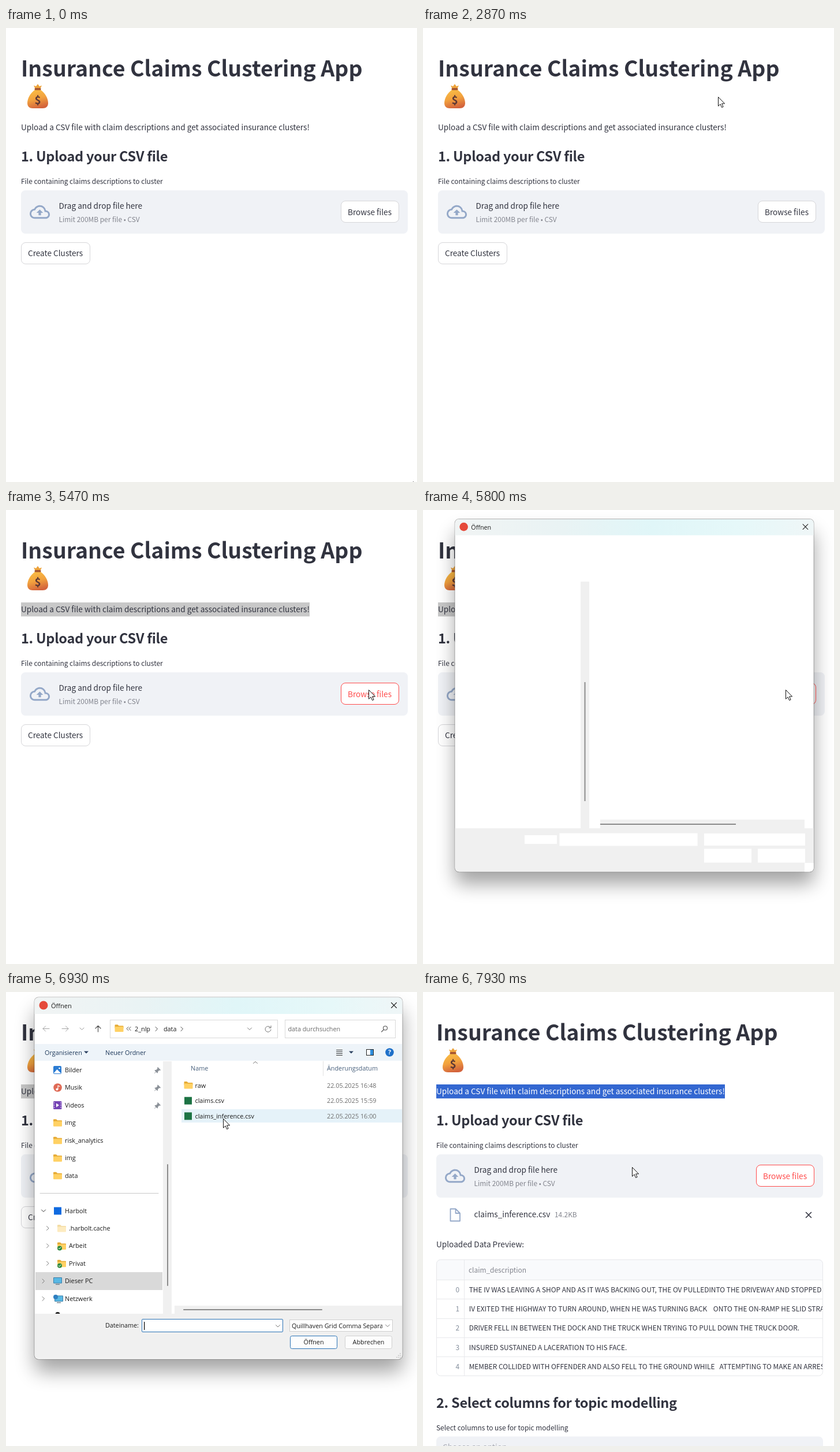
Recreate the animation shown at these times as an HTML page. Size 712 by 786 pixels, loop 8 s.

```html
<!DOCTYPE html>
<html lang="en">
<head>
<meta charset="utf-8">
<title>Claims clustering demo</title>
<style>
  html, body { margin: 0; width: 100%; height: 100%; overflow: hidden; background: #fff; }
  svg { display: block; width: 712px; height: 786px; }
  text { white-space: pre; }
  .page { font-family: "Noto Sans CJK JP", "Noto Sans CJK SC", "Noto Sans CJK", sans-serif; fill: #31333f; }
  .ui { font-family: "Open Sans", "Noto Sans", sans-serif; font-size: 10.8px; fill: #1b1b1b; }
  .head { font-weight: 600; letter-spacing: -.3px; }
  .line { fill: none; stroke-linecap: round; stroke-linejoin: round; }
</style>
</head>
<body>
<svg id="stage" viewBox="0 0 712 786"></svg>
<script>
const LOOP = 8000, STEP = 200 / 3;
const BODY = 13.62, SMALL = 11.92, HEAD = 23.55, TITLE = 37.46;
const INK = '#31333f', FADED = '#83858e', RED = '#ff4b4b', ICON = '#94a8c8';

const text = (x, y, str, size, more = '') =>
  `<text x="${x}" y="${y}"${size ? ` font-size="${size}"` : ''} ${more}>${str}</text>`;
const rect = (x, y, w, h, fill, more = '') =>
  `<rect x="${x}" y="${y}" width="${w}" height="${h}" fill="${fill}" ${more}/>`;
const path = (d, fill, more = '') => `<path d="${d}" fill="${fill}" ${more}/>`;
const line = (d, color, width = 1, more = '') =>
  `<path class="line" d="${d}" stroke="${color}" stroke-width="${width}" ${more}/>`;
const disc = (x, y, r, fill) => `<circle cx="${x}" cy="${y}" r="${r}" fill="${fill}"/>`;
const group = (id, body, more = '') => `<g id="${id}" ${more}>${body}</g>`;
const at = (x, y, body) => `<g transform="translate(${x} ${y})">${body}</g>`;
const mid = 'text-anchor="middle"';

/* ---------- web page ---------- */
const intro = 'Upload a CSV file with claim descriptions and get associated insurance clusters!';

const moneyBag =
  path('M50 107C42 113 37 122 37 130c0 6 4 9 9 9h18c5 0 9-3 9-9 0-8-5-17-13-23Z', 'url(#bag)') +
  path('M48 99.5l4 1.5 3-4 3 4 4-1.5-2.5 5.5h-9Z', '#eda33c') +
  rect(49.5, 104, 11, 3.6, '#a4532f', 'rx="1.5"') +
  text(55, 131.5, '$', 19, `${mid} font-weight="700" fill="#5d3834"`);

const cloud = at(41, 301, path(
  'M19.35 10.04A7.49 7.49 0 0 0 12 4C9.11 4 6.6 5.64 5.35 8.04A5.99 5.99 0 0 0 0 14c0 3.31 2.69 6 6 6h13' +
  'c2.76 0 5-2.24 5-5 0-2.64-2.05-4.78-4.65-4.96zM19 18H6c-2.21 0-4-1.79-4-4 0-2.05 1.53-3.76 3.56-3.97' +
  'l1.07-.11.5-.95C8.08 7.14 9.94 6 12 6c2.62 0 4.88 1.86 5.39 4.43l.3 1.5 1.53.11c1.56.1 2.78 1.41 2.78 2.96' +
  ' 0 1.65-1.35 3-3 3zM8 13h2.55v3h2.9v-3H16l-4-4z', ICON, 'transform="scale(1.46)"'));

const anchor = at(288, 215, line(
  'M6.5 8.5a3.6 3.6 0 0 0 5.4.4l2.2-2.2a3.6 3.6 0 0 0-5.1-5.1L7.8 2.9M9.5 7a3.6 3.6 0 0 0-5.4-.4' +
  'L1.9 8.8A3.6 3.6 0 0 0 7 13.9l1.2-1.2', '#a3a5ad', 1.5));

const fileRow =
  line('M50.5 375.5h9l7.5 7.5v13.5h-16.5zM59.5 375.5v7.5h7.5', ICON, 1.8) +
  text(91.5, 390, 'claims_inference.csv', BODY) +
  text(231, 390, '14.2KB', SMALL, `fill="${FADED}"`) +
  line('M666.5 381.5l9 9m0-9l-9 9', INK, 1.6);

const rows = [
  'THE IV WAS LEAVING A SHOP AND AS IT WAS BACKING OUT, THE OV PULLEDINTO THE DRIVEWAY AND STOPPED',
  'IV EXITED THE HIGHWAY TO TURN AROUND, WHEN HE WAS TURNING BACK    ONTO THE ON-RAMP HE SLID STRAIGHT',
  'DRIVER FELL IN BETWEEN THE DOCK AND THE TRUCK WHEN TRYING TO PULL DOWN THE TRUCK DOOR.',
  'INSURED SUSTAINED A LACERATION TO HIS FACE.',
  'MEMBER COLLIDED WITH OFFENDER AND ALSO FELL TO THE GROUND WHILE   ATTEMPTING TO MAKE AN ARREST'
];
const preview =
  text(26, 441.5, 'Uploaded Data Preview:', BODY) +
  `<g clip-path="url(#tableClip)">` +
  rect(26, 463, 670, 35, '#f9fafc') +
  text(82, 486, 'claim_description', SMALL, `fill="${FADED}"`) +
  rows.map((row, i) => {
    const y = 498 + i * 33.3;
    return line(`M26 ${Math.round(y) + .5}H696`, '#e8e9ec') +
      text(66, y + 21.7, i, SMALL, 'text-anchor="end" fill="#838d9b"') +
      text(82.7, y + 21.7, row, SMALL);
  }).join('') +
  line('M74.5 463V665', '#e8e9ec') + '</g>' +
  rect(26.5, 463.5, 669, 201, 'none', 'rx="7" stroke="#e6e7ea"') +
  text(26, 720, '2. Select columns for topic modelling', HEAD, 'class="head"') +
  text(26, 759, 'Select columns to use for topic modelling', SMALL) +
  rect(26, 769.5, 670, 40, '#f0f2f6', 'rx="7.5"') +
  text(37, 793, 'Choose an option', BODY, 'fill="#a7a9b2"');

const page = group('page',
  text(26, 83.5, 'Insurance Claims Clustering App', TITLE, 'font-weight="700"') +
  moneyBag +
  text(26, 177, intro, BODY) +
  `<g clip-path="url(#selClip)">` + rect(26, 160, 500, 24.5, '#3367d1', 'id="selBox"') +
  text(26, 177, intro, BODY, 'id="selText"') + '</g>' +
  text(26, 231, '1. Upload your CSV file', HEAD, 'class="head"') +
  group('anchor', anchor) +
  text(26, 270, 'File containing claims descriptions to cluster', SMALL) +
  rect(26, 281, 670, 75, '#f0f2f6', 'rx="7.5"') + cloud +
  text(91.5, 313, 'Drag and drop file here', BODY) +
  text(91.5, 336, 'Limit 200MB per file • CSV', SMALL, `fill="${FADED}"`) +
  rect(580.5, 299.5, 100, 37, '#fff', 'rx="7.5" id="browseBox"') +
  text(630, 323.5, 'Browse files', BODY, `${mid} id="browseText"`) +
  group('create', rect(26.5, 371.5, 119, 37, '#fff', 'rx="7.5" stroke="#d6d6d9"') +
    text(85.5, 395, 'Create Clusters', BODY, mid)) +
  group('fileRow', fileRow) + group('preview', preview), 'class="page"');

/* ---------- file dialog ---------- */
const chevron = {
  down: (x, y, c = '#777') => line(`M${x - 3.5} ${y - 2}l3.5 3.5 3.5-3.5`, c),
  right: (x, y, c = '#777') => line(`M${x - 2} ${y - 3.5}l3.5 3.5-3.5 3.5`, c),
  up: (x, y, c = '#777') => line(`M${x - 3.5} ${y + 1.5}l3.5-3 3.5 3`, c)
};
const drop = (x, y) => path(`M${x - 4} ${y - 2}h8l-4 4z`, '#2a3f5f');
const folder = (x, y, pale) => at(x, y,
  path('M0 1.5q0-1 1-1h4l2 2h7q1 0 1 1v3H0z', pale ? '#f3dca4' : '#e6ab35') +
  rect(0, 4, 15, 9, pale ? '#fdebc0' : '#ffd164', 'rx="1"'));
const badge = (x, y) => disc(x, y, 4, '#2d8a41') + line(`M${x - 2} ${y}l1.4 1.5 2.6-3`, '#fff');
const pin = y => at(263, y,
  path('M0-5l5 5-1 1-1.5-.5L0 3v2l-1 .5-2-2-2.5 2.5-.5-.5L-3.5 3l-2-2 .5-1h2L-.5-2.5-1-4z', '#8b9198'));
const screen = (x, y) => rect(x, y, 15, 10.5, '#3d7fa8', 'rx="1"') +
  rect(x + 1, y + 1, 13, 8.5, '#58b8e4') + rect(x + 4, y + 11.5, 7, 1.5, '#76838d');

const places = [
  ['Bilder', rect(82, 128, 14, 14, '#2b7cd3', 'rx="2"') + path('M83 140l5.5-6 7 7h-12z', '#fff') +
    disc(92.5, 132, 1.3, '#fff')],
  ['Musik', disc(89.5, 165.5, 7.3, '#df6a55') + line('M90 168.5v-6.5l3 1.5', '#fff', 1.2) +
    disc(88.3, 168.5, 1.9, '#fff')],
  ['Videos', rect(82, 189, 14.5, 14, '#7545b5', 'rx="1.5"') + path('M87 192.5v7l5-3.5z', '#fff') +
    line('M83.5 191v10M95 191v10', '#d7c3ef', 1.2, 'stroke-dasharray="1.5 2.5"')],
  ['img'], ['risk_analytics'], ['img'], ['data']
].map(([name, icon], i) => {
  const y = 135 + i * 30.45;
  return (icon || folder(82, y - 6.5)) + text(102, y + 4, name) + (icon ? pin(y) : '');
}).join('');

const tree =
  line('M59 348.5H264', '#c9c9c9') +
  chevron.down(65, 379, '#333') + rect(83, 372.5, 13, 13, '#0f6ae0') + text(102, 382.5, 'Harbolt') +
  ['.harbolt.cache', 'Arbeit', 'Privat'].map((name, i) => {
    const y = 409 + i * 30.4;
    return chevron.right(72.5, y) + folder(89, y - 6.5, !i) + (i ? badge(93, y + 4) : '') + text(109, y + 4, name);
  }).join('') +
  rect(51, 485, 220, 31, '#d9d9d9') +
  chevron.right(65, 500.5) + screen(82, 494) + text(102, 504, 'Dieser PC') +
  chevron.right(65, 531) + screen(84, 525.5) + disc(86, 528, 4, '#2f7fc0') + text(102, 535, 'Netzwerk') +
  disc(89.5, 558, 4, '#222') + text(102, 565, 'Linux');

const files = [
  ['raw', '22.05.2025 16:48'], ['claims.csv', '22.05.2025 15:59'], ['claims_inference.csv', '22.05.2025 16:00']
].map(([name, date], i) => {
  const y = 161.5 + i * 26.7;
  return (i ? rect(309, y - 6.5, 13, 13, '#1d7344') : folder(308.5, y - 7)) +
    text(327.5, y + 4, name) + text(556, y + 4, date, 0, 'fill="#6d6d6d"');
}).join('');

const toolbar =
  line('M75 63.5H64m4.5-4.5l-4.5 4.5 4.5 4.5M97 63.5h11m-4.5-4.5l4.5 4.5-4.5 4.5', '#a3a3a3') +
  chevron.down(131.5, 64, '#999') +
  line('M159.5 69V58.5m-4.5 4.5l4.5-4.5 4.5 4.5', '#555', 1.2) +
  rect(180.5, 48.5, 290, 31, '#fff', 'stroke="#d9d9d9"') + folder(188.5, 56) +
  line('M212 60.5l-3 3 3 3m4-6l-3 3 3 3', '#444') +
  text(223, 67.5, '2_nlp') + chevron.right(261, 64, '#444') +
  text(273, 67.5, 'data') + chevron.right(305, 64, '#444') + chevron.down(422, 64) +
  line('M458.5 62a5 5 0 1 0 .5 3M459 58.5v3.5h-3.5', '#777') +
  rect(483.5, 48.5, 191, 31, '#fff', 'stroke="#d9d9d9"') +
  text(488.5, 67.5, 'data durchsuchen', 0, 'fill="#6b6b6b"') +
  line('M660.5 62.5a3.5 3.5 0 1 0-7 0a3.5 3.5 0 1 0 7 0M654.5 65l-4 4', '#555', 1.1) +
  rect(50, 90, 636, 29, '#eef4f9') +
  text(67, 108.5, 'Organisieren', 0, 'fill="#1e395b"') + drop(139, 104.5) +
  text(172, 108.5, 'Neuer Ordner', 0, 'fill="#1e395b"') +
  line('M572.5 100.5h10m-10 3h10m-10 3h10m-10 3h10', '#333', 1.1) + drop(598, 104.5) +
  rect(624.5, 99.5, 12, 10, '#fff', 'stroke="#222"') + rect(631, 100, 5, 9, '#2f8fdf') +
  disc(664.5, 104.5, 7.3, '#1f70c9') +
  text(664.5, 108.3, '?', 0, `${mid} fill="#fff" font-weight="700"`);

const footer =
  rect(50, 557, 636, 77, '#f0f0f0') +
  text(230, 581, 'Dateiname:', 0, 'text-anchor="end"') +
  rect(235.5, 566.5, 244, 22, '#fff', 'rx="1.5" stroke="#2a72b5"') + chevron.down(471, 578.5) +
  text(239.5, 581.5, 'claims_inference.csv', 0, 'id="fileName"') +
  rect(239, 571, 1.2, 14, '#000', 'id="caret"') +
  rect(491.5, 567.5, 178, 20, '#fff', 'stroke="#cfcfcf"') +
  `<g clip-path="url(#typeClip)">${text(495, 581.5, 'Quillhaven Grid Comma Separated')}</g>` +
  chevron.down(661, 578) +
  rect(492.5, 595.5, 81, 22, '#fdfdfd', 'rx="3" stroke="#2a72b5"') + text(533, 610, 'Öffnen', 0, mid) +
  rect(587.5, 595.5, 81, 22, '#fdfdfd', 'rx="3" stroke="#d0d0d0"') + text(628, 610, 'Abbrechen', 0, mid) +
  line('M683 626v.1m0 3v.1m-3 0v.1m3 3v.1m-3 0v.1m-3 0v.1', '#9a9a9a', 1.3);

const content = toolbar +
  `<g clip-path="url(#navClip)">${places}${tree}</g>` +
  rect(272, 120, 15, 437, '#f0f0f0') + rect(279, 298, 2, 211, '#8b8b8b', 'rx="1"') +
  text(320, 136, 'Name', 0, 'fill="#48607c"') + chevron.up(432, 122) +
  line('M549.5 120V145', '#e2e2e2') + text(556, 136, 'Änderungsdatum', 0, 'fill="#48607c"') +
  rect(304, 203, 382, 23, '#e5f2f9', 'id="rowHover"') + files +
  rect(292, 543, 394, 14, '#f0f0f0') + rect(307, 549, 241, 2, '#8b8b8b', 'rx="1"') + footer;

// Placeholder blocks are laid out at the size they have while the window grows.
const skeleton =
  rect(273, 124, 15, 427, '#f0f0f0') + rect(279.5, 298, 2, 206, '#8b8b8b') +
  rect(307, 536, 354, 15, '#f0f0f0') + rect(307, 543, 235, 2, '#8b8b8b') +
  rect(50, 551, 632, 80, '#f0f0f0') + rect(176, 563, 56, 15, '#fff') + rect(236.5, 559.5, 239, 22, '#fff') +
  [[487, 560, 175, 21], [487, 586.5, 82, 24], [580, 586.5, 82, 24], [661, 611, 20, 20]]
    .map(b => rect(...b, '#fff')).join('');

const zoom = s => `translate(290 268) scale(${s}) translate(-290 -268)`;

const dialog = group('dialog',
  rect(50, 32, 637, 625, '#000', 'rx="10" opacity=".36" filter="url(#blur)"') +
  rect(49.5, 9.5, 637, 626, '#fff', 'rx="7" stroke="#000" stroke-opacity=".28" stroke-width="2"') +
  `<g clip-path="url(#winClip)">` +
  rect(49, 9, 638, 628, '#fff') + rect(49, 9, 638, 29, 'url(#bar)') +
  disc(65, 23, 7.5, '#e5493a') + text(78, 27.5, 'Öffnen', 11) +
  line('M667.5 18.5l9 9m0-9l-9 9', '#222', 1.1) +
  group('skeleton', skeleton, `transform="${zoom(1 / .975)}"`) +
  group('content', content) + '</g>', 'class="ui"');

const pointer = group('pointer',
  path('M.5.5V16.2l3.6-3.4 2.5 5.7 2.5-1.1-2.5-5.5h5z', '#fff', 'stroke="#111" stroke-linejoin="round"'));

const clip = (id, x, y, w, h, more = '') => `<clipPath id="${id}">${rect(x, y, w, h, '#000', more)}</clipPath>`;
const stops = list => list.map(([o, c]) => `<stop offset="${o}" stop-color="${c}"/>`).join('');
const defs = `<defs>
  <linearGradient id="bag" x1=".2" y1="0" x2=".5" y2="1">${stops([[0, '#f9bd45'], [.5, '#f2a23e'], [1, '#d3633c']])}</linearGradient>
  <linearGradient id="bar">${stops([[0, '#f1f4f4'], [.3, '#e9f3f4'], [.55, '#e0f6f8'], [.8, '#e6f8f9'], [1, '#eff6f7']])}</linearGradient>
  <filter id="blur" x="-20%" y="-20%" width="140%" height="140%"><feGaussianBlur stdDeviation="17"/></filter>
  ${clip('selClip', 26, 160, 500, 24.5, 'id="selMask"')}
  ${clip('tableClip', 26, 463, 670, 202, 'rx="7"')}
  ${clip('navClip', 50, 119, 222, 438)}
  ${clip('winClip', 49.5, 9.5, 637, 626, 'rx="7"')}
  ${clip('typeClip', 492, 568, 160, 19)}
</defs>`;

document.getElementById('stage').innerHTML = defs + page + dialog + pointer;

/* ---------- motion ---------- */
const el = {};
document.querySelectorAll('#stage [id]').forEach(node => el[node.id] = node);
const set = (id, attrs) => { for (const k in attrs) el[id].setAttribute(k, attrs[k]); };
const show = (id, on) => set(id, { visibility: on ? 'inherit' : 'hidden' });

const pointerKeys = [
  [0, 705, 785], [70, 705, 785], [270, 676, 745], [600, 565, 630], [930, 467, 528],
  [1200, 292, 392], [1470, 90, 252], [1670, 1, 185], [1800, 12, 166], [1930, 13, 165],
  [2000, 13, 165], [2330, 150, 165], [2600, 330, 147], [2870, 511, 119],
  [2930, 520, 135], [3130, 532, 168], [3930, 532, 168],
  [4000, 540, 177], [4200, 572, 226], [4400, 607, 285], [4600, 628, 311],
  [6400, 628, 311], [6600, 520, 270], [6870, 376, 219], [7730, 376, 219], [7930, 362, 303]
];
const dialogKeys = [
  [5670, .93, 0], [5730, .95, .5], [5800, .975, 1], [5870, .99, 1], [5930, 1, 1],
  [7270, 1, 1], [7530, .93, 0]
];
function track(keys, t) {
  if (t <= keys[0][0]) return keys[0].slice(1);
  const i = keys.findIndex(k => k[0] > t);
  if (i < 0) return keys[keys.length - 1].slice(1);
  const a = keys[i - 1], b = keys[i], p = (t - a[0]) / (b[0] - a[0]);
  return a.slice(1).map((v, j) => v + (b[j + 1] - v) * p);
}

function draw(time) {
  const t = Math.round(Math.floor((time + 5) / STEP) * STEP / 10) * 10;
  const [x, y] = track(pointerKeys, t);
  set('pointer', { transform: `translate(${Math.round(x)} ${Math.round(y)})` });

  let selected = 0;
  if (t >= 2930) selected = 500;
  else if (t > 2000 && y > 148) selected = Math.max(0, Math.min(500, x - 26));
  const blurred = t >= 5470 && t < 7530;
  set('selMask', { width: selected });
  set('selBox', { fill: blurred ? '#c8c8c8' : '#3367d1' });
  set('selText', { fill: blurred ? INK : '#fff' });

  const pressed = t >= 5270 && t < 5400;
  const hot = t > 5000 || (x > 580 && y > 299 && y < 337 && t > 4000);
  set('browseBox', { fill: pressed ? RED : '#fff', stroke: hot ? RED : '#d6d6d9' });
  set('browseText', { fill: pressed ? '#fff' : hot ? RED : INK });
  show('anchor', t > 4000 && t < 4600 && y > 203 && y < 243);

  const uploaded = t >= 7800, loaded = t >= 7870;
  set('page', { transform: `translate(${loaded ? -3 : 0} 0)` });
  set('create', { transform: `translate(0 ${uploaded ? 46 : 0})` });
  show('create', !loaded);
  show('fileRow', uploaded);
  show('preview', loaded);

  const [size, alpha] = track(dialogKeys, t);
  show('dialog', alpha > 0);
  set('dialog', { transform: zoom(size), opacity: alpha });
  show('skeleton', t < 5930);
  show('content', t >= 5930);
  const chosen = t >= 7270;
  const over = t >= 5930 && y < 226;
  set('rowHover', { fill: chosen ? '#cce8ff' : '#e5f2f9', 'fill-opacity': over ? 1 : 0 });
  set('fileName', { 'fill-opacity': chosen ? 1 : 0 });
  set('caret', { 'fill-opacity': !chosen && (t < 6400 || t >= 6930) ? 1 : 0 });
}

const start = performance.now();
function tick() {
  draw((performance.now() - start) % LOOP);
  requestAnimationFrame(tick);
}
tick();
</script>
</body>
</html>
```
